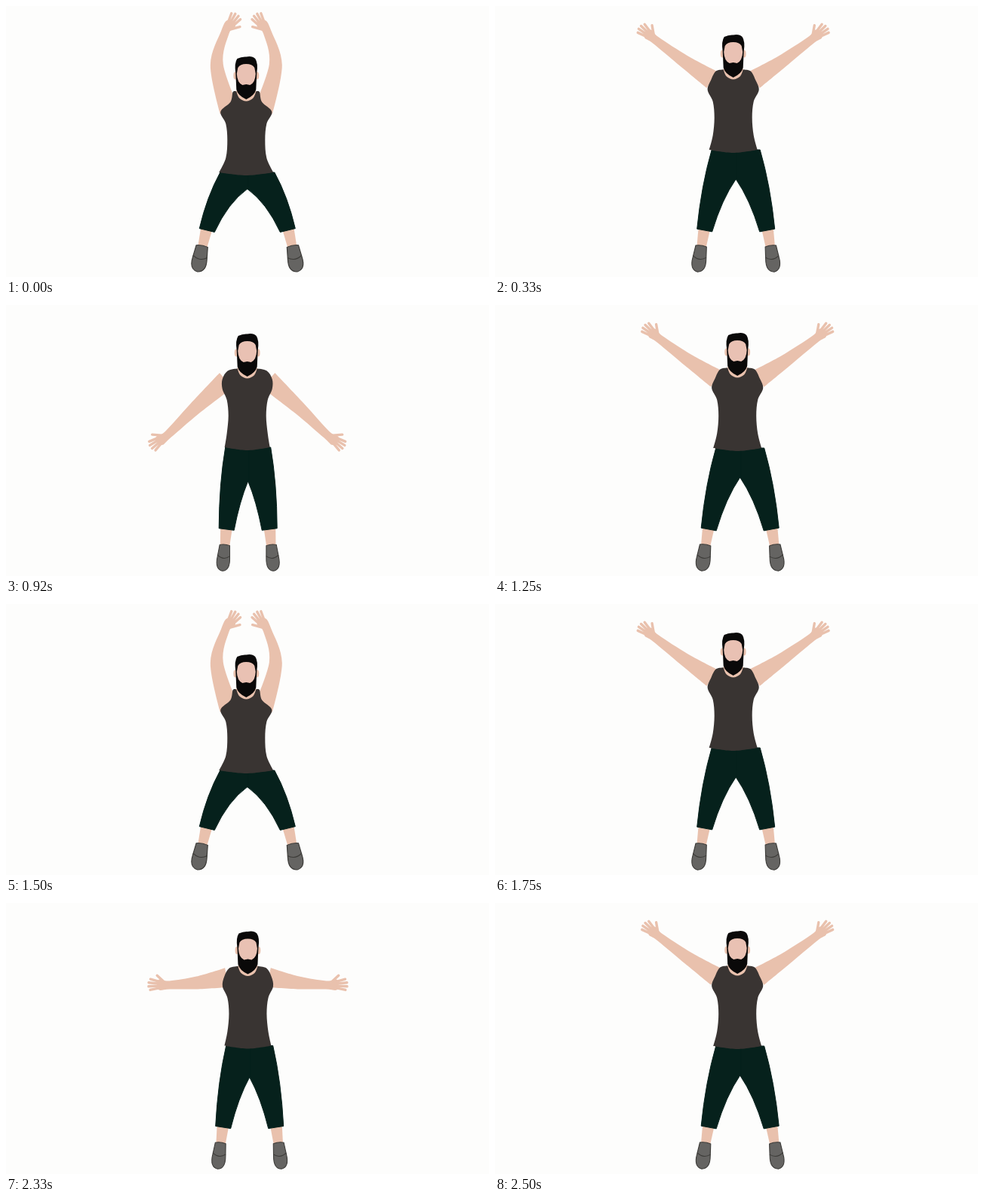
An HTML page that plays this animation: 640x360 px, repeating every 2580 ms.

```html
<!DOCTYPE html>
<html lang="en">
<head>
<meta charset="utf-8">
<title>Jumping jacks</title>
<style>
  html, body { margin: 0; width: 100%; height: 100%; overflow: hidden; background: #fdfdfc; }
  svg { display: block; width: 100vw; height: 100vh; }
</style>
</head>
<body>
<svg viewBox="0 0 640 360">
  <g id="figure">
    <g id="limbs"></g>
    <path id="neck" fill="#e9c1ad"/>
    <path id="torso" fill="#393432"/>
    <g id="head">
      <g fill="#e9c1ad">
        <ellipse cx="-14.5" cy="25.500" rx="2.400" ry="5"/>
        <ellipse cx="14.5" cy="25.500" rx="2.400" ry="5"/>
      </g>
      <path fill="#0a0909" d="M-14 22 Q-16 9 -12 3 Q-6 0 0 .5 Q8 -1 12 3 Q16 9 14 22 L13 44 Q11 52 0 57 Q-11 52 -13 44Z"/>
      <path fill="#e9c1b3" d="M-11 15 Q-8 10 0 10 Q8 10 11 15 L12.500 23 Q12 35 5 38 L0 37 L-5 38 Q-12 35 -12.500 23Z"/>
    </g>
  </g>
</svg>
<script>
const RATE = 12, LOOP = 2580;
const SKIN = '#e9c1ad', SHORTS = '#06211c', SHOE = '#656462', LINE = '#3c3b38';
const ARM_WIDTHS = [26, 17, 11, 13];
const HEM = 298, ANKLE = 319;

// Arm joints and leg spread are distances from the body axis; hand is a direction in degrees.
const poses = {
  up: {
    x: 318.3, head: 67, hem: 221, crotch: 243, raise: 1.2, pit: 34, leg: 53.5, lean: 1.5,
    shoulder: [22, 140], elbow: [39, 78], wrist: [28, 35], hand: -124, spread: 1
  },
  wide: {
    x: 321.2, head: 37, hem: 190, crotch: 229, raise: .4, pit: 34, leg: 41.5, lean: 3.5,
    shoulder: [28, 98], elbow: [64, 74], wrist: [102, 46], hand: -39, spread: 1
  },
  low: {
    x: 319.7, head: 38, hem: 189, crotch: 234, raise: 0, pit: 33, leg: 28.5, lean: 1,
    shoulder: [28, 100], elbow: [70, 138], wrist: [105, 172], hand: 36, spread: 1
  },
  stand: {
    x: 320.3, head: 60, hem: 202, crotch: 235, raise: 0, pit: 28, leg: 19.5, lean: 1.5,
    shoulder: [27, 118], elbow: [37, 162], wrist: [40.5, 202], hand: 86, spread: .25
  }
};

const lerp = (a, b, k) => Array.isArray(a) ? a.map((v, i) => lerp(v, b[i], k)) : a + (b - a) * k;
const mix = (a, b, k) => Object.fromEntries(Object.keys(a).map(key => [key, lerp(a[key], b[key], k)]));

poses.fall = { ...poses.wide, x: 315.7, head: 38, hem: 191, crotch: 230 };
poses.drop = mix(poses.fall, poses.low, .6);
poses.rise = mix(poses.low, poses.wide, .5);

// pose:beat, or pose:first-last where it is held
const keys = ('up:0-2 fall:4 drop:6-7 low:8 stand:9-10 low:11 wide:15 up:17-20 fall:21-22 low:24 ' +
  'stand:25-26 low:27 rise:28-29 wide:30 up:31').split(' ').flatMap(item => {
  const [name, beats] = item.split(':');
  return beats.split('-').map(beat => ({ beat: +beat, pose: poses[name] }));
});

function poseAt(beat) {
  const i = keys.findIndex(key => key.beat > beat);
  const a = keys[i - 1], b = keys[i];
  return mix(a.pose, b.pose, (beat - a.beat) / (b.beat - a.beat));
}

const el = id => document.getElementById(id);
const polygon = pts => `M${pts.join('L')}Z`;
const polar = ([x, y], angle, r) => [x + r * Math.cos(angle), y + r * Math.sin(angle)];

// Closed smooth curve; listed corners stay sharp.
function curve(pts, corners = []) {
  const n = pts.length;
  const slope = pts.map((p, i) => {
    if (corners.includes(i)) return [0, 0];
    const a = pts[(i + n - 1) % n], b = pts[(i + 1) % n];
    return [(b[0] - a[0]) / 6, (b[1] - a[1]) / 6];
  });
  let d = 'M' + pts[0];
  pts.forEach((p, i) => {
    const j = (i + 1) % n, q = pts[j], s = slope[i], t = slope[j];
    d += `C${p[0] + s[0]},${p[1] + s[1]} ${q[0] - t[0]},${q[1] - t[1]} ${q}`;
  });
  return d + 'Z';
}

// Outline of a limb with a given width at each joint.
function ribbon(joints, widths) {
  const edge = side => joints.map((p, i) => {
    const a = joints[Math.max(i - 1, 0)], b = joints[Math.min(i + 1, joints.length - 1)];
    const along = Math.atan2(b[1] - a[1], b[0] - a[0]);
    return polar(p, along + side * Math.PI / 2, widths[i] / 2);
  });
  return curve([...edge(-1), ...edge(1).reverse()], [0, 2 * joints.length - 1]);
}

const mirror = half => [...half, ...half.slice(1, -1).reverse().map(([x, y]) => [-x, y])];

function arm(pose) {
  const { shoulder, elbow, wrist, spread } = pose;
  const angle = pose.hand * Math.PI / 180;
  const palm = polar(wrist, angle, 15);
  let fingers = '';
  for (let i = -1.5; i <= 1.5; i++) {
    const base = polar(palm, angle + Math.PI / 2, i * 3);
    fingers += `M${base}L${polar(base, angle + i * .16 * spread, 14 - Math.abs(i) * 2)}`;
  }
  const thumb = `M${polar(wrist, angle, 3)}L${polar(wrist, angle - .62 * spread, 21)}`;
  return `<path d="${ribbon([shoulder, elbow, wrist, palm], ARM_WIDTHS)}" fill="${SKIN}"/>
    <path d="${fingers}${thumb}" fill="none" stroke="${SKIN}" stroke-width="3.4" stroke-linecap="round"/>`;
}

function leg({ leg: k, hem, crotch, raise }) {
  const hip = 30 + 5 * raise, ankle = 1.17 * k - 2.5;
  const inner = k - 10, outer = k + 10, tilt = k * .045;
  const shin = polygon([[k - 8, HEM - 4], [k + 8, HEM - 4], [ankle + 6, ANKLE + 4], [ankle - 6, ANKLE + 4]]);
  const shorts = `M-1,${hem}L${hip},${hem}Q${(hip + outer) / 2 + 4},${(hem + HEM) / 2 - 6} ${outer},${HEM - tilt}
    L${inner},${HEM + tilt}Q${inner / 2 + k * .07},${(crotch + HEM) / 2 - k * .17} 0,${crotch}L-1,${crotch}Z`;
  return `<path d="${shin}" fill="${SKIN}"/>
    <g transform="translate(${ankle},${ANKLE}) rotate(${-k * .19}) scale(${.85 + k / 160},1)"
       fill="${SHOE}" stroke="${LINE}">
      <path d="M-6.500 0Q0 -2 6.500 0L8 16Q10 33 0 34.500Q-10 33 -8 16Z"/>
      <path d="M-8 14Q0 21 8 14" fill="none"/>
    </g>
    <path d="${shorts}" fill="${SHORTS}" stroke="${SHORTS}" stroke-linejoin="round"/>`;
}

function torso({ head, hem, raise, pit }) {
  const top = head + 46.5, height = hem - top;
  const half = [
    [0, top + 13], [9, top + 9], [13, top],
    [26 - 7 * raise, top + 3 - 2 * raise], [pit - 11 * raise, top + 14], [pit, top + 27],
    [27, top + height * .4], [25, top + height * .6], [27, top + height * .82],
    [30 + 5 * raise, hem], [0, hem + 4]
  ];
  return curve(mirror(half), [2, 9, 11, 18]);
}

function neck({ head }) {
  const half = [[0, head + 38], [9, head + 40], [14, head + 47], [13, head + 62], [0, head + 63]];
  return polygon(mirror(half));
}

function draw(pose) {
  const right = `<g transform="translate(${pose.lean},0)">${leg(pose)}</g>${arm(pose)}`;
  const left = `<g transform="translate(${-pose.lean},0)">${leg(pose)}</g>${arm(pose)}`;
  el('limbs').innerHTML = `<g>${right}</g><g transform="scale(-1,1)">${left}</g>`;
  el('torso').setAttribute('d', torso(pose));
  el('neck').setAttribute('d', neck(pose));
  el('head').setAttribute('transform', `translate(0,${pose.head})`);
  el('figure').setAttribute('transform', `translate(${pose.x},0)`);
}

const start = performance.now();
let shown = -1;
function tick() {
  const t = (performance.now() - start) % LOOP;
  // Beats start on whole hundredths of a second, so allow a slight lead.
  const beat = Math.min(Math.floor(t * RATE / 1000 + .05), 30);
  if (beat !== shown) draw(poseAt(shown = beat));
  requestAnimationFrame(tick);
}
tick();
</script>
</body>
</html>
```
